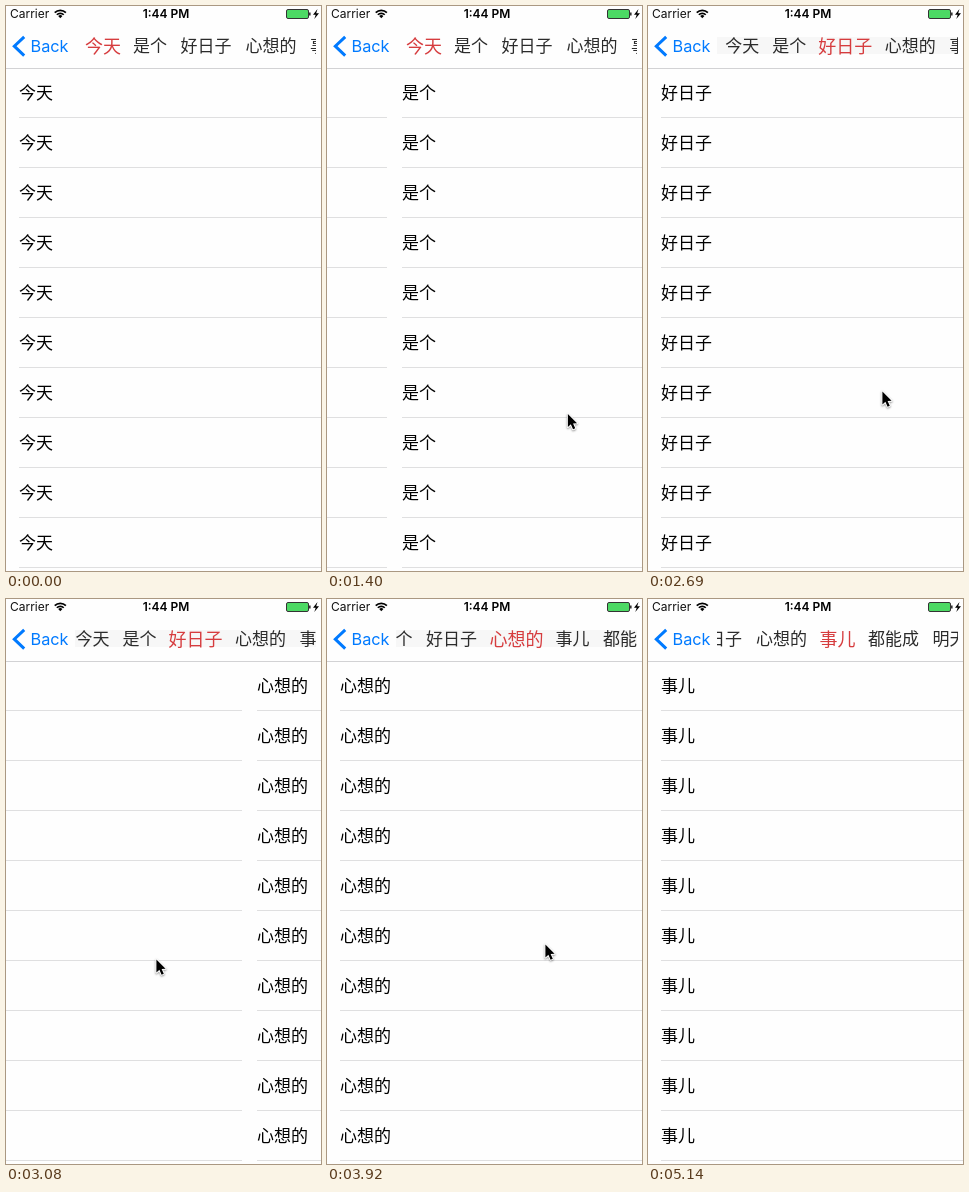
An HTML page with a canvas that plays this animation: 315 by 565 pixels, repeating every 5.44 s.

```html
<!DOCTYPE html>
<html lang="zh-CN">
<head>
<meta charset="utf-8">
<style>
html, body { margin: 0; width: 100%; height: 100%; overflow: hidden; background: #fff; }
canvas { display: block; }
</style>
</head>
<body>
<canvas id="stage" width="315" height="565"></canvas>
<script>
const ctx = document.getElementById('stage').getContext('2d');
const LOOP = 5440, W = 315, H = 565, STRIDE = 317;
const CJK = '"Noto Sans CJK SC", "Noto Sans CJK", sans-serif';
const LATIN = 'Inter, Roboto, sans-serif';
const BLUE = '#007aff';
const VIEW = { left: 69, right: 310, mid: 189.5 };

// A swipe pulls the page part of the way, holds it, then lets it settle.
const PULL = .25, DRAG = 105, SETTLE = 330, SCROLL = 300;
const swipes = [
  { grab: 990, drop: 1282, left: [205, 415], rest: [253, 405] },
  { grab: 1930, drop: 2260, left: [93, 390], rest: [234, 385] },
  { grab: 2950, drop: 3295, left: [150, 360], rest: [218, 345] },
  { grab: 4000, drop: 4277, left: [140, 353], rest: [156, 353] }
];
const ENTER = 510, LEAVE = 5140;

const titles = ['今天', '是个', '好日子', '心想的', '事儿', '都能成', '明天'];
let edge = 73.5;
const tabs = titles.map(title => {
  const width = 18 * title.length + 11;
  const mid = edge + width / 2;
  edge += width;
  return { title, mid, scroll: Math.max(0, mid - VIEW.mid) };
});

const ramp = (t, from, length) => Math.min(1, Math.max(0, (t - from) / length));
const easeOut = k => 1 - (1 - k) ** 3;
const easeInOut = k => (1 - Math.cos(Math.PI * k)) / 2;
const mix = (a, b, k) => a + (b - a) * k;
const mixPoint = (a, b, k) => [mix(a[0], b[0], k), mix(a[1], b[1], k)];

function stateAt(t) {
  let page = 0, selected = 0, scroll = 0;
  let cursor = mixPoint([304, 508], [271, 440], ramp(t, ENTER, 140));
  swipes.forEach(({ grab, drop, left, rest }, i) => {
    const drag = ramp(t, grab, DRAG);
    const settle = easeOut(ramp(t, drop, SETTLE));
    const done = drop + SETTLE;
    page += mix(PULL * drag, 1, settle);
    cursor = mixPoint(mixPoint(cursor, left, drag), rest, settle);
    if (t >= done) selected = i + 1;
    scroll = mix(scroll, tabs[i + 1].scroll, easeInOut(ramp(t, done, SCROLL)));
  });
  cursor = mixPoint(cursor, [215, 566], ramp(t, 4700, LEAVE - 4700));
  return { page, selected, scroll, cursor };
}

function text(str, x, y, font, color, align = 'left') {
  ctx.font = font;
  ctx.fillStyle = color;
  ctx.textAlign = align;
  ctx.fillText(str, x, y);
}

function rect(x, y, w, h, color) {
  ctx.fillStyle = color;
  ctx.fillRect(x, y, w, h);
}

function polygon(points) {
  ctx.beginPath();
  points.forEach(([x, y]) => ctx.lineTo(x, y));
}

function drawPages(pos) {
  for (let i = Math.floor(pos); i <= Math.ceil(pos); i++) {
    const x = Math.round((i - pos) * STRIDE) + 13;
    for (let y = 62; y < 562; y += 50) {
      text(titles[i], x, y + 31, '17px ' + CJK, '#000');
      rect(x, y + 49, W - 13, 1, '#dfdfe0');
    }
  }
}

function drawTabs(selected, scroll, shaded) {
  const width = VIEW.right - VIEW.left;
  ctx.save();
  ctx.beginPath();
  ctx.rect(VIEW.left, 30, width, 22);
  ctx.clip();
  if (shaded) rect(VIEW.left, 31, width, 17, '#f7f7f7');
  tabs.forEach((tab, i) => {
    const on = i === selected;
    text(tab.title, tab.mid - scroll, on ? 46.8 : 46.4,
      (on ? 18 : 17) + 'px ' + CJK, on ? '#d63c3e' : '#2b2b2b', 'center');
  });
  ctx.restore();
}

function drawWifi(x, y) {
  const fan = r => ctx.arc(x, y, r, -Math.PI * .75, -Math.PI * .25);
  ctx.strokeStyle = ctx.fillStyle = '#000';
  ctx.lineWidth = 1.7;
  for (const r of [4.9, 7.9]) {
    ctx.beginPath();
    fan(r);
    ctx.stroke();
  }
  ctx.beginPath();
  ctx.moveTo(x, y);
  fan(3);
  ctx.fill();
}

function drawBattery() {
  rect(281, 4, 21, 8, '#4cd964');
  ctx.strokeStyle = '#333';
  ctx.lineWidth = 1;
  ctx.beginPath();
  ctx.roundRect(280.5, 3.5, 22, 9, 1.5);
  ctx.stroke();
  rect(303, 6.5, 1.6, 3, '#333');
  polygon([[311.5, 3], [307, 8.7], [309.7, 8.7], [308.3, 13], [313, 7.2], [310.2, 7.2]]);
  ctx.fillStyle = '#000';
  ctx.fill();
}

function drawBars() {
  rect(0, 62, W, 1, '#d2d2d4');
  text('Carrier', 4, 12.3, '12px ' + LATIN, '#111');
  text('1:44 PM', 160, 12.3, '600 12px ' + LATIN, '#000', 'center');
  text('Back', 24.5, 46, '16.3px ' + LATIN, BLUE);
  polygon([[18.2, 30.8], [8.3, 40.2], [18.2, 49.6]]);
  ctx.strokeStyle = BLUE;
  ctx.lineWidth = 3;
  ctx.stroke();
  drawWifi(54.3, 12.2);
  drawBattery();
}

function drawCursor([x, y]) {
  ctx.save();
  ctx.translate(x + .4, y + .5);
  polygon([[0, 0], [0, 13], [3, 10.2], [5.2, 15.2], [7.4, 14.2], [5.2, 9.4], [9.2, 9.2]]);
  ctx.closePath();
  ctx.lineJoin = 'round';
  ctx.lineWidth = 2;
  ctx.strokeStyle = '#fff';
  ctx.shadowColor = 'rgba(0,0,0,.4)';
  ctx.shadowBlur = 2;
  ctx.shadowOffsetY = 1;
  ctx.stroke();
  ctx.shadowColor = 'transparent';
  ctx.fillStyle = '#000';
  ctx.fill();
  ctx.restore();
}

const start = performance.now();
function frame() {
  const t = (performance.now() - start) % LOOP;
  const { page, selected, scroll, cursor } = stateAt(t);
  rect(0, 0, W, H, '#fefefe');
  drawPages(page);
  drawBars();
  drawTabs(selected, scroll, selected > 1 && t < LEAVE);
  if (t >= ENTER && t < LEAVE) drawCursor(cursor);
  requestAnimationFrame(frame);
}
frame();
</script>
</body>
</html>
```
